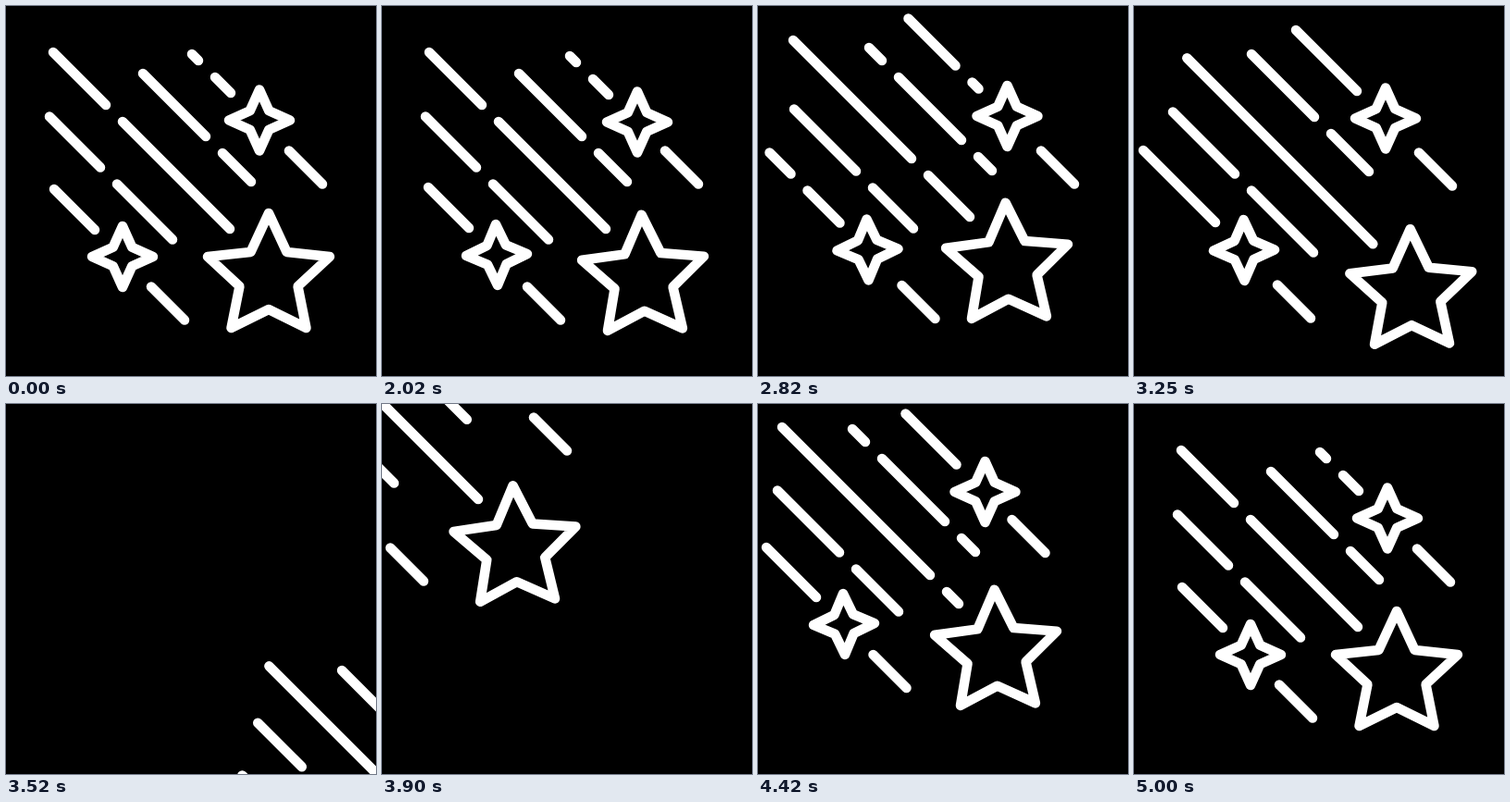
Animation, 400 px wide and 400 px high, one loop 5020 ms. Source, as an HTML page with a canvas:

```html
<!DOCTYPE html>
<html lang="en">
<head>
<meta charset="utf-8">
<title>Shooting stars</title>
<style>
html, body { margin: 0; height: 100%; overflow: hidden; background: #000; }
canvas { display: block; width: 100vw; height: 100vh; }
</style>
</head>
<body>
<canvas id="stage" width="400" height="400"></canvas>
<script>
const ctx = document.getElementById('stage').getContext('2d');
const LOOP = 5020, START = 2020, END = 4995, STEP = 25;

const smooth = u => u * u * (3 - 2 * u);
const linear = u => u;
const easeIn = u => u * u;
const easeOut = u => 1 - (1 - u) * (1 - u);

function track(times, values, t, eases = []) {
  let i = 0;
  while (i < times.length - 2 && t >= times[i + 1]) i++;
  const u = Math.min(1, Math.max(0, (t - times[i]) / (times[i + 1] - times[i])));
  return values[i] + (values[i + 1] - values[i]) * (eases[i] || linear)(u);
}

// Diagonal travel: sway, shoot out, re-enter, overshoot, settle.
const moveTimes = [START, 2530, 2820, 3245, 3590, 3591, 3895, 4170, 4420, 4620, 4750, END];
const moveEases = [smooth, smooth, smooth, easeIn, linear, linear, easeOut, smooth, smooth, smooth, easeOut];
function offset([start, sway, back, launch, enter, brake], t) {
  if (t < START || t >= END) return 0;
  const keys = [start, sway, back, launch, 370, -370, enter, -45, brake, 28, 6, 0];
  return track(moveTimes, keys, t, moveEases);
}

const moves = {
  star: [0, 44, -13, 16.3, -138, -25],
  left: [-2, 4, -7.5, -7, -170, -33],
  right: [2, 6, -4.5, -2, -170, -28.5],
  leftFront: [0, 4, -1.5, -2, -148, -32.5],
  rightFront: [0, 6, 0, 2, -142, -31.5],
  low: [0, 22, -12, 15, -167, -28],
  high: [0, 15, -12, -11, -167, -30]
};

// Trails: c = x - y; gap and tail positions are x values relative to the moving head.
const flowTimes = [START, 2820, 3245, 4420, END];
const trails = [
  { move: 'star', c: 1, head: 242, period: 219, gaps: [108, -40, -196, -446, -549], tails: [51, 51, 41, 51, 51] },
  { move: 'low', c: -72.5, head: 180, period: 85, gaps: [102, 33, 9, -54, -68], tails: [47, 47, 27, 47, 47] },
  { move: 'left', c: -146, head: 96, period: 97, gaps: [34, -54, -99, -170, -190], tails: [52, 20, 17, 42, 52] },
  { move: 'high', c: 75, head: 265, period: 86, gaps: [130, 60, 34, -26, -42], tails: [132, 132, 132, 132, 132] },
  { move: 'right', c: 149, head: 243, period: 86, gaps: [208, 132, 73, -2, -50], tails: [201, 167, 175, 188, 201] }
];
const GAP = 18;

function line(x1, x2, c) {
  ctx.beginPath();
  ctx.moveTo(x1, x1 - c);
  ctx.lineTo(x2, x2 - c);
  ctx.stroke();
}

function drawTrail({ move, c, head, period, gaps, tails }, t) {
  const d = offset(moves[move], t);
  const gap = track(flowTimes, gaps, t);
  const tail = track(flowTimes, tails, t);
  ctx.setLineDash([(period - GAP) * Math.SQRT2, GAP * Math.SQRT2]);
  const phase = (((tail - gap - GAP) % period) + period) % period;
  ctx.lineDashOffset = phase * Math.SQRT2;
  line(tail + d, head + d, c);
  ctx.setLineDash([]);
}

function drawShape(points, x, y, degrees) {
  ctx.save();
  ctx.translate(x, y);
  ctx.rotate(degrees * Math.PI / 180);
  ctx.beginPath();
  for (const [px, py] of points) ctx.lineTo(px, py);
  ctx.closePath();
  ctx.stroke();
  ctx.restore();
}

const half = [[0, -68], [19.5, -26], [66, -21], [31.5, 11], [40.5, 56], [0, 36]];
const mirror = half.slice(1, 5).reverse().map(([x, y]) => [-x, y]);
const bigStar = [...half, ...mirror];
const sparkle = Array.from({ length: 8 }, (_, i) => {
  const r = i % 2 ? 14.5 : 33, a = i * Math.PI / 4;
  return [r * Math.sin(a), -r * Math.cos(a)];
});

function draw(time) {
  let t = time % LOOP;
  if (t >= START) t = START + Math.floor((t - START) / STEP) * STEP;
  const tilt = t < START || t >= END ? 0
    : track([START, 2820, 3245, 3895, 4420, END], [1, 1, 0.5, 1.3, 1, 0], t);
  const at = name => offset(moves[name], t);

  ctx.fillStyle = '#000';
  ctx.fillRect(0, 0, 400, 400);
  ctx.strokeStyle = '#fff';
  ctx.lineWidth = 10.5;
  ctx.lineCap = ctx.lineJoin = 'round';

  for (const trail of trails) drawTrail(trail, t);
  const l = at('leftFront'), r = at('rightFront');
  line(157 + l, 193 + l, -146.5);
  line(306 + r, 342 + r, 149.5);

  const s = at('star'), a = at('left'), b = at('right');
  drawShape(bigStar, 284 + s - 1.3 * tilt, 292 + s + 1.7 * tilt, -1.8 * tilt);
  drawShape(sparkle, 126 + a, 271 + a, -1.7 * tilt);
  drawShape(sparkle, 274 + b, 123.5 + b, 0);
}

const begin = performance.now();
function frame() {
  draw(performance.now() - begin);
  requestAnimationFrame(frame);
}
frame();
</script>
</body>
</html>
```
